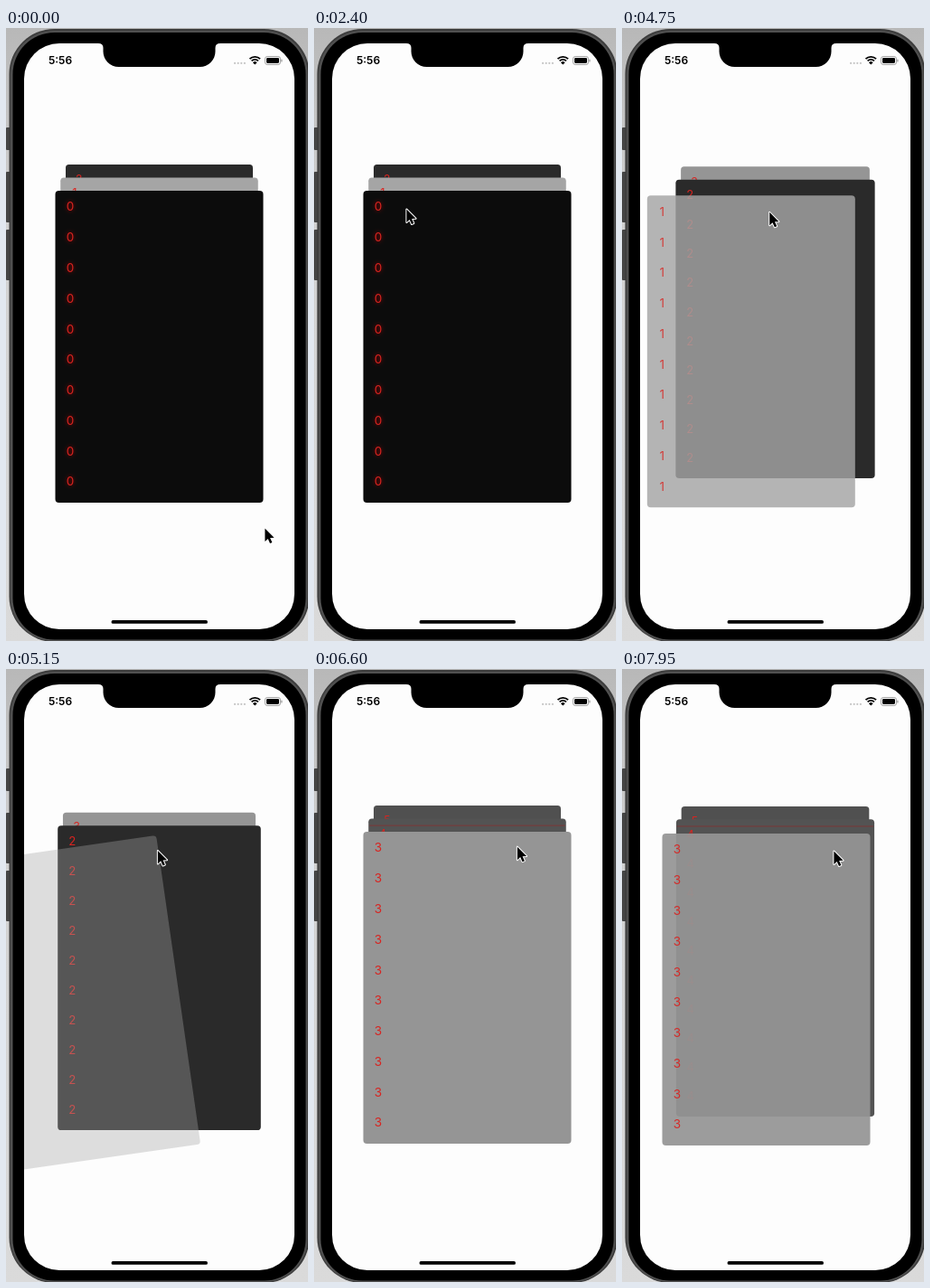
Animation of 334 by 678 pixels, one loop 8 s. Source, as an HTML page with a canvas:

```html
<!DOCTYPE html>
<html lang="en">
<head>
<meta charset="utf-8">
<title>Card stack</title>
<style>
  html, body { margin: 0; width: 100%; height: 100%; overflow: hidden; background: #d0d0d0; }
  canvas { display: block; width: 334px; height: 678px; }
</style>
</head>
<body>
<canvas id="stage"></canvas>
<script>
const W = 334, H = 678, LOOP = 8000, STEP = 50;
const canvas = document.getElementById('stage');
const ctx = canvas.getContext('2d');
const dpr = window.devicePixelRatio || 1;
canvas.width = W * dpr;
canvas.height = H * dpr;

const CARD = { w: 230, h: 345, cx: 169.5, cy: 352.5, rows: 10, rowH: 33.78 };
const COLORS = ['#0c0c0c', '#a5a5a5', '#2a2a2a', '#959595', '#535353', '#505050'];
const PULL = 48;   // how far the pointer drags a card
const GONE = 175;  // drag distance at which the next card is in front
const FADE = 145;  // drag distance at which a card is invisible
const DROP = 0.2;  // cards sink by this share of the drag

// Drag from start to pulled, let go at release, fly to end at done.
const SWIPES = [
  { card: 0, start: 2500, pulled: 3100, release: 3400, done: 4200, end: GONE, x: 102, y: 200 },
  { card: 1, start: 4500, pulled: 4950, release: 4950, done: 5450, end: GONE, x: 189.5, y: 198 },
  { card: 2, start: 5500, pulled: 6000, release: 6000, done: 6550, end: GONE, x: 176.5, y: 198 },
  { card: 3, start: 6800, pulled: 7150, release: 7150, done: 7600, end: 0, x: 226, y: 196 },
  { card: 3, start: 7700, pulled: 8900, release: 8900, done: 9400, end: GONE, x: 244, y: 199 }
];

// Pointer moves before the first swipe.
const APPROACH = [
  { from: 50, to: 200, x: 276, y: 502 },
  { from: 400, to: 650, x: 229, y: 212 },
  { from: 800, to: 1600, x: 72, y: 208 },
  { from: 1650, to: 2400, x: 102, y: 200 }
];

const clamp = v => Math.min(1, Math.max(0, v));
const span = (t, a, b) => clamp((t - a) / (b - a));
const mix = (a, b, u) => a + (b - a) * u;
const smooth = u => u * u * (3 - 2 * u);
const easeOut = u => 1 - (1 - u) ** 3;

function dragAt(s, t) {
  const held = PULL * span(t, s.start, s.pulled);
  return t < s.release ? held : mix(PULL, s.end, smooth(span(t, s.release, s.done)));
}

function pointerAt(t) {
  let p = { x: 286, y: 553 };
  const move = (to, u) => { p = { x: mix(p.x, to.x, u), y: mix(p.y, to.y, u) }; };
  for (const m of APPROACH) move(m, smooth(span(t, m.from, m.to)));
  let free = SWIPES[0].start;
  for (const s of SWIPES) {
    if (t < free) break;
    move(s, s.start > free ? easeOut(span(t, free, s.start)) : 1);
    const held = PULL * span(t, s.start, s.pulled);
    p = { x: p.x - held, y: p.y + held * DROP };
    free = s.release;
  }
  return p;
}

function roundBox(x, y, w, h, r, fill) {
  ctx.beginPath();
  ctx.roundRect(x, y, w, h, r);
  ctx.fillStyle = fill;
  ctx.fill();
}

function drawPhone() {
  const side = ctx.createLinearGradient(0, 0, 0, H);
  side.addColorStop(0, '#b8b8b8');
  side.addColorStop(0.3, '#d0d0d0');
  side.addColorStop(1, '#dadada');
  ctx.fillStyle = side;
  ctx.fillRect(0, 0, W, H);
  for (const [y, h] of [[110, 25], [159, 56], [223, 56]]) roundBox(0, y, 6, h, 1, '#454545');
  roundBox(3.5, 1, 332, 678, 50, '#3c3c3c');
  roundBox(5, 3, 328.5, 675, 48, '#505050');
  roundBox(7.5, 5, 324, 671.5, 46, '#000');
}

function drawNotch() {
  ctx.beginPath();
  ctx.moveTo(102, 16);
  ctx.lineTo(102, 17);
  ctx.quadraticCurveTo(107.5, 17, 107.5, 22);
  ctx.arcTo(107.5, 43, 125, 43, 17);
  ctx.arcTo(231.5, 43, 231.5, 22, 17);
  ctx.lineTo(231.5, 22);
  ctx.quadraticCurveTo(231.5, 17, 237, 17);
  ctx.lineTo(237, 16);
  ctx.fillStyle = '#000';
  ctx.fill();
}

function drawStatus() {
  ctx.fillStyle = '#000';
  ctx.font = '600 12px Inter, sans-serif';
  ctx.textAlign = 'center';
  ctx.fillText('5:56', 60, 40.3);

  for (let i = 0; i < 4; i++) roundBox(252 + i * 3.6, 37.8, 2.2, 2.2, 1.1, '#c6c6c6');

  ctx.strokeStyle = '#000';
  ctx.lineWidth = 1.8;
  for (const r of [8.2, 5.2]) {
    ctx.beginPath();
    ctx.arc(275.3, 40, r, -Math.PI * 0.75, -Math.PI * 0.25);
    ctx.stroke();
  }
  ctx.beginPath();
  ctx.moveTo(275.3, 40.6);
  ctx.arc(275.3, 40.6, 3.3, -Math.PI * 0.75, -Math.PI * 0.25);
  ctx.fillStyle = '#000';
  ctx.fill();

  ctx.strokeStyle = '#999';
  ctx.lineWidth = 0.9;
  ctx.beginPath();
  ctx.roundRect(286.5, 31.5, 17, 9, 2.6);
  ctx.stroke();
  roundBox(288, 33, 14, 6, 1.4, '#000');
  roundBox(304.3, 34.5, 1.2, 3, 0.6, '#999');

  roundBox(116.5, 655, 106.5, 3.8, 1.9, '#000');
}

// depth 0 is the front of the stack; drag moves the card left
function drawCard(n, depth, drag) {
  const { w, h, cx, cy, rows, rowH } = CARD;
  const scale = 1 - 0.05 * depth;
  const tilt = Math.max(0, drag - 33) * 0.137;

  ctx.save();
  ctx.globalAlpha = clamp(1 - drag / FADE);
  ctx.translate(cx - drag, cy - 23.1 * depth + drag * DROP);
  ctx.rotate(-tilt * Math.PI / 180);
  ctx.scale(scale, scale);
  ctx.translate(-w / 2, -h / 2);
  roundBox(0, 0, w, h, 4, COLORS[n]);

  if (n === 4) {
    ctx.fillStyle = '#7c3636';
    ctx.fillRect(1, 7.5, w - 2, 1);
  }
  ctx.font = '400 13.5px Inter, sans-serif';
  ctx.textAlign = 'center';
  ctx.fillStyle = '#d82420';
  if (n === 0) {
    ctx.shadowColor = '#a00000';
    ctx.shadowBlur = 4 * dpr;
  }
  for (let i = 0; i < rows; i++) ctx.fillText(n, 16.4, 22.4 + i * rowH);
  ctx.restore();
}

function drawStack(t) {
  const s = SWIPES.find(s => t < s.done);
  const drag = dragAt(s, t);
  for (let i = 2; i > 0; i--) drawCard(s.card + i, i - drag / GONE, 0);
  drawCard(s.card, 0, drag);
}

function drawPointer(t) {
  const p = pointerAt(t);
  ctx.save();
  ctx.translate(p.x, p.y);
  ctx.beginPath();
  [[0.4, 0.5], [0.4, 15], [3.7, 11.9], [6, 17], [8.4, 16], [6.1, 11], [10.6, 10.8]]
    .forEach(([x, y]) => ctx.lineTo(x, y));
  ctx.closePath();
  ctx.fillStyle = '#000';
  ctx.strokeStyle = '#fff';
  ctx.lineWidth = 2;
  ctx.lineJoin = 'round';
  ctx.stroke();
  ctx.fill();
  ctx.restore();
}

function draw(t) {
  ctx.setTransform(dpr, 0, 0, dpr, 0, 0);
  drawPhone();
  ctx.save();
  ctx.beginPath();
  ctx.roundRect(20, 17, 299, 648, 39);
  ctx.fillStyle = '#fdfdfd';
  ctx.fill();
  ctx.clip();
  drawStack(t);
  drawStatus();
  ctx.restore();
  drawNotch();
  drawPointer(t);
}

const start = performance.now();
function tick() {
  const t = (performance.now() - start) % LOOP;
  draw(Math.floor(t / STEP) * STEP);
  requestAnimationFrame(tick);
}
tick();
</script>
</body>
</html>
```
